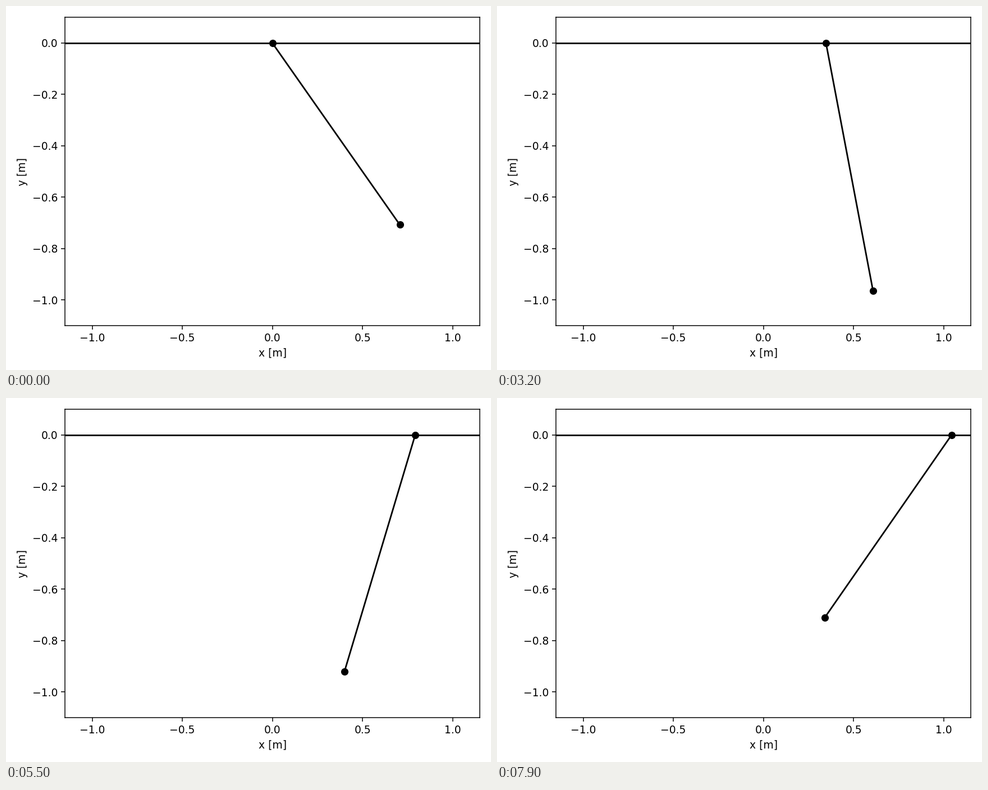
These frames come from a looping animation (864 by 648 pixels, 8000 ms). A matplotlib script:

```python
import numpy as np
import matplotlib.pyplot as plt
from matplotlib.animation import FuncAnimation

# Pendulum hanging from a free slider, small-angle solution
G, LENGTH = 9.81, 1.0
M_SLIDER, M_BOB = 0.5, 1.0
THETA0 = np.pi / 4
DT = 0.7 / 99
FRAMES, INTERVAL = 80, 100

OMEGA = np.sqrt(G / LENGTH * (1 + M_BOB / M_SLIDER))
RATIO = M_BOB / (M_SLIDER + M_BOB)

plt.rcParams["font.family"] = "DejaVu Sans"
fig, ax = plt.subplots(figsize=(6.4, 4.8), dpi=135)
ax.set_xlim(-1.15, 1.15)
ax.set_ylim(-1.1, 0.1)
ax.set_xlabel("x [m]")
ax.set_ylabel("y [m]")
ax.plot([-1.15, 1.15], [0, 0], color="black", lw=1.5)
rod, = ax.plot([], [], "o-", color="black", lw=1.5, ms=6)
fig.tight_layout()


def update(i):
    theta = THETA0 * np.cos(OMEGA * i * DT)
    x = RATIO * LENGTH * (THETA0 - theta)
    rod.set_data([x, x + LENGTH * np.sin(theta)], [0, -LENGTH * np.cos(theta)])
    return rod,


anim = FuncAnimation(fig, update, frames=FRAMES, interval=INTERVAL,
                     repeat=True, repeat_delay=0, blit=False)
plt.show()
```
